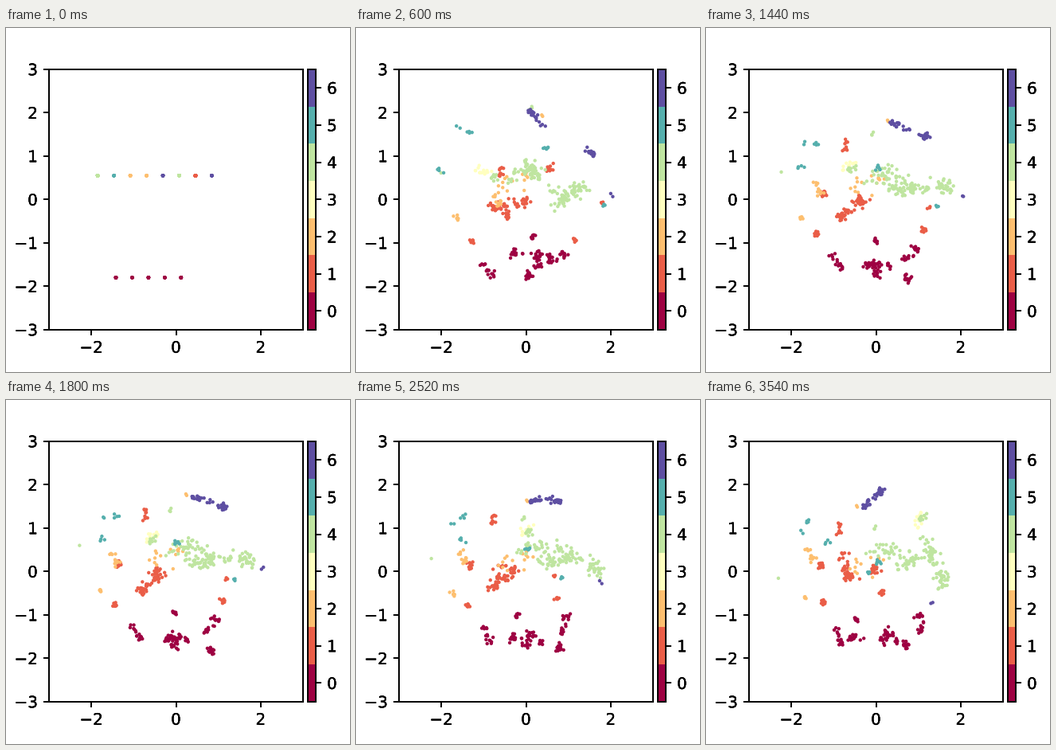
Write a matplotlib script that moves like this. It is 432 px wide and 432 px high and loops after 3.67 s.

```python
import numpy as np
import matplotlib.pyplot as plt
from matplotlib import patheffects
from matplotlib.animation import FuncAnimation
from matplotlib.colors import BoundaryNorm

SIZE, DPI = 432, 144
STEPS, HOLD, TICK, LOOP = 60, 60, 10, 3670
BURST, TURN = 10, 30  # steps at which the clusters are spread, then regrouped
TOP, HEIGHT = 51.8, 327
# starting slots of each class in its row
SLOTS = {0: (0, 1, 2, 3, 4), 1: (6,), 2: (2, 3), 3: (5,), 4: (0, 5), 5: (1,), 6: (4, 7)}

rng = np.random.default_rng(7)
parts = []


def blob(cls, n, first, middle, last, size=(0.1, 0.02), tilt=(0, 0)):
    """Add a clumpy strand of n points whose centre visits three places."""
    knots = rng.uniform(-0.5, 0.5, max(2, n // 4))
    along = size[0] * (rng.choice(knots, n) + rng.normal(0, 0.08, n))
    across = size[1] * rng.normal(0, 1, n)
    x0, y0 = (-1.42, -1.8) if cls == 0 else (-1.85, 0.55)
    start = x0 + 0.385 * rng.choice(SLOTS[cls], n) + 1j * y0
    centres = [np.full(n, complex(*p)) for p in (first, middle, last)]
    turns = [np.full(n, np.radians(a)) for a in tilt]
    parts.append([np.full(n, cls), start, *centres, along + 1j * across, *turns])


blob(0, 16, (-0.9, -1.6), (-0.93, -1.4), (-0.87, -1.5), (0.5, 0.05), (-45, -75))
blob(0, 16, (-0.2, -1.25), (-0.08, -1.55), (-0.46, -1.53), (0.35, 0.07))
blob(0, 7, (0.17, -0.85), (-0.04, -0.95), (-0.48, -1.1), (0.18, 0.03))
blob(0, 34, (0.35, -1.36), (0.05, -1.6), (0.3, -1.53), (0.5, 0.1), (20, -30))
blob(0, 14, (0.1, -1.7), (0.88, -1.77), (0.77, -1.65), (0.35, 0.05), (60, 30))
blob(0, 20, (0.72, -1.35), (0.82, -1.25), (1.04, -1.2), (0.5, 0.05), (20, 95))

blob(1, 11, (-0.6, 0.7), (-0.73, 1.38), (-0.87, 1.05), (0.35, 0.02), (90, 90))
blob(1, 8, (-1.19, -0.93), (-1.37, -0.75), (-1.2, -0.67), (0.25, 0.03), (10, 45))
blob(1, 12, (-0.5, -0.4), (-1.4, 0.13), (-1.36, 0.1), (0.22, 0.05), (60, 30))
blob(1, 38, (-0.5, -0.12), (-0.65, -0.25), (-0.74, 0.13), (0.7, 0.07), (10, 100))
blob(1, 15, (0.03, 0), (-0.4, 0.05), (0, 0.1), (0.4, 0.05), (50, 50))
blob(1, 12, (0.5, 0.65), (-0.5, -0.2), (-0.65, -0.1), (0.45, 0.05), (65, 0))
blob(1, 7, (1.17, -1), (1.16, -0.73), (0.2, -0.47), (0.3, 0.02), (-70, 30))
blob(1, 3, (1.8, -0.08), (1.15, -0.17), (-0.13, 0))

blob(2, 12, (-0.7, 0), (-1.48, 0.3), (-1.58, 0.4), (0.38, 0.04), (-70, -65))
blob(2, 6, (-1.6, -0.4), (-1.73, -0.43), (-1.62, -0.6), (0.18, 0.03))
blob(2, 2, (0.4, 1.95), (0.3, 1.75), (-0.4, 1.47))
blob(2, 14, (-0.1, 0.55), (-0.1, 0.45), (-0.1, 0.25), (1, 0.18))

blob(3, 14, (-1, 0.65), (-0.55, 0.8), (1.03, 1.22), (0.3, 0.06), (-35, 35))

blob(4, 45, (0.95, 0.02), (1.3, 0.3), (1.4, 0.15), (0.9, 0.09), (30, -70))
blob(4, 32, (0.8, 0.1), (0.72, 0.35), (1.24, 0.52), (0.5, 0.1), (-30, -60))
blob(4, 32, (0.15, 0.65), (0.5, 0.22), (0.77, 0.22), (0.6, 0.1), (-60, 20))
blob(4, 28, (-0.2, 0.57), (0.05, 0.55), (0.1, 0.5), (0.8, 0.1), (25, -5))
blob(4, 8, (-0.7, 0.5), (-0.5, 0.7), (1.16, 1.22), (0.25, 0.06))
blob(4, 3, (0.12, 2.13), (-0.1, 1.4), (0, 0.98))
blob(4, 1, (-2.03, 0.65), (-2.25, 0.62), (-2.28, -0.15))

blob(5, 6, (-1.5, 1.62), (-1.6, 1.25), (-1.7, 1), (0.35, 0.02), (-30, 60))
blob(5, 4, (-2, 0.67), (-1.7, 0.75), (-1.1, 0.67), (0.15, 0.02))
blob(5, 6, (0.45, 1.15), (0, 0.65), (0.05, 0.2), (0.35, 0.04), (45, 45))
blob(5, 3, (1.85, -0.13), (1.43, -0.2), (-0.13, -0.05))

blob(6, 20, (0.27, 1.85), (0.65, 1.67), (-0.1, 1.67), (0.55, 0.025), (-45, 45))
blob(6, 18, (1.6, 1), (1.2, 1.45), (0.2, 1.85), (0.5, 0.03), (-45, 15))
blob(6, 2, (2.02, 0.1), (2.03, 0.05), (1.3, -0.75))

labels, start, first, middle, last, shape, turn0, turn1 = (
    np.concatenate(column) for column in zip(*parts))
phase = rng.uniform(0, 2 * np.pi, len(labels))


def drift(step):
    """Centres ease from place to place while each strand turns."""
    if step < TURN:
        s = (step - BURST) / (TURN - BURST)
        centre = first + (middle - first) * np.sin(s * np.pi / 2)
    else:
        s = (step - TURN) / (STEPS - 1 - TURN)
        centre = middle + (last - middle) * s * s * (3 - 2 * s)
    t = (step - BURST) / (STEPS - 1 - BURST)
    turn = turn0 + (turn1 - turn0) * t
    wander = 0.03 * np.exp(1j * (phase + 0.2 * step))
    return centre + shape * np.exp(1j * turn) + wander


def positions(step):
    if step >= BURST:
        pos = drift(step)
    else:
        s = step / BURST
        pos = start + (drift(BURST) - start) * (1 - (1 - s) ** 2.5)
        pos = pos - 0.28j * np.sin(np.pi * s) * (labels == 0)
    return np.column_stack([pos.real, pos.imag])


def rect(x, w):
    return [x / SIZE, 1 - (TOP + HEIGHT) / SIZE, w / SIZE, HEIGHT / SIZE]


def embolden(axes):
    """Solid two-pixel lines and dense lettering."""
    width = 2 * 72 / DPI
    axes.tick_params(width=width)
    for spine in axes.spines.values():
        spine.set_linewidth(width)
    for text in axes.get_xticklabels() + axes.get_yticklabels():
        text.set_path_effects([patheffects.Normal()] * 4)


fig = plt.figure(figsize=(SIZE / DPI, SIZE / DPI), dpi=DPI)
ax = fig.add_axes(rect(54, 319))
cax = fig.add_axes(rect(379, 10))
ax.set(xlim=(-3, 3), ylim=(-3, 3), xticks=[-2, 0, 2], yticks=range(-3, 4))

dots = ax.scatter(*positions(0).T, c=labels, s=1.4,
                  cmap=plt.get_cmap("Spectral", 7),
                  norm=BoundaryNorm(np.arange(8) - 0.5, 7))
bar = fig.colorbar(dots, cax=cax, ticks=range(7))
bar.ax.minorticks_off()
bar.outline.set_linewidth(2 * 72 / DPI)
embolden(ax)
embolden(cax)


def update(i):
    step = min(i * TICK // HOLD, STEPS - 1)
    dots.set_offsets(positions(step))
    return (dots,)


anim = FuncAnimation(fig, update, frames=LOOP // TICK, interval=TICK,
                     repeat=True, repeat_delay=0)
plt.show()
```
